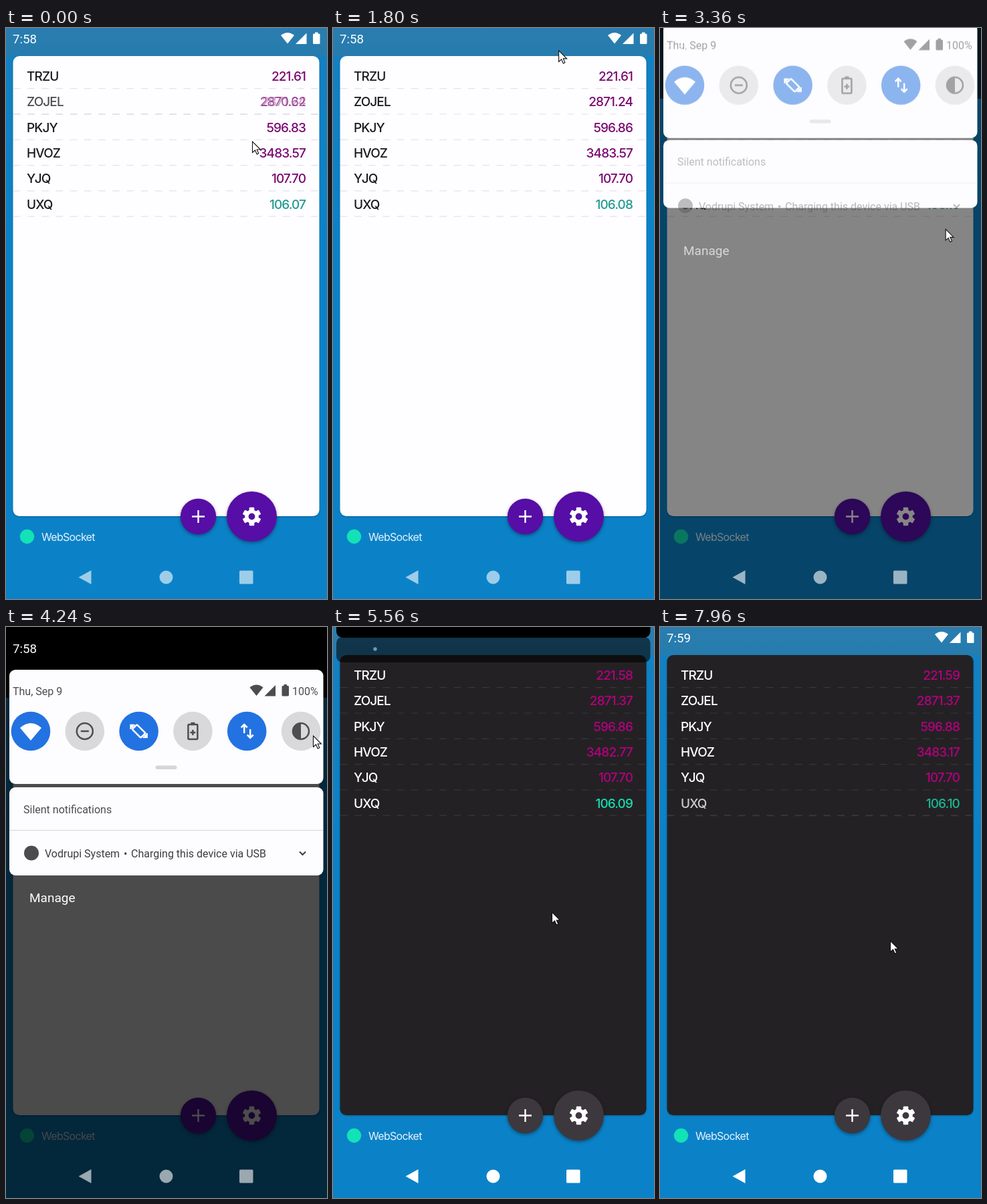
An HTML page for the animation above (8000 ms loop, 480 px wide and 855 px high).

```html
<!DOCTYPE html>
<html lang="en">
<head>
<meta charset="utf-8">
<title>Ticker list</title>
<style>
  html, body { margin: 0; width: 100%; height: 100%; overflow: hidden; background: #0b82c8; }
  svg { display: block; width: 100vw; height: 100vh; }
  text { font-family: Roboto, sans-serif; font-size: 16px; white-space: pre; }
  .row text { font: 500 19px Inter, sans-serif; letter-spacing: -.9px; }
  .row .label { fill: var(--ink); }
  .row .price { fill: var(--down); text-anchor: end; }
  .row .price.up { fill: var(--up); }
  .row path { stroke: var(--line); stroke-dasharray: 10.6 10.6; }
  .fab { fill: var(--fab); filter: drop-shadow(0 2px 2.5px #0006); }
  .clock { font-size: 18.7px; fill: #fff; }
  .socket { font: 16px Inter, sans-serif; letter-spacing: -.7px; fill: #e8f3fb; }
  .panel { fill: var(--panel); }
  .head { fill: var(--head); }
  .note { fill: var(--note); }
  .icon { fill: none; stroke: currentColor; stroke-width: 2.5; }
  .solid { fill: currentColor; stroke: none; }
</style>
</head>
<body>
<svg viewBox="0 0 480 855" preserveAspectRatio="none">
  <defs>
    <g id="signal">
      <path d="M10 17.5 0 5Q10-3 20 5Z"/>
      <path d="M38.500 1.500V18H22Z"/>
      <path d="M51 .5h4.500v2H57q1.500 0 1.500 1.500v12.500q0 1.500-1.500 1.500h-7.500q-1.500 0-1.500-1.500V4q0-1.500 1.500-1.500H51Z"/>
    </g>
    <linearGradient id="bar" x2="0" y2="1">
      <stop stop-color="#2a7dae"/><stop offset="1" stop-color="#267caf"/>
    </linearGradient>
    <linearGradient id="sky" x2="0" y2="1">
      <stop stop-color="#1480c0"/><stop offset=".35" stop-color="#0b82c8"/>
    </linearGradient>
  </defs>

  <rect width="480" height="855" fill="url(#sky)"/>
  <rect width="480" height="42" fill="url(#bar)"/>
  <g id="status">
    <text id="clock" class="clock" x="10" y="22.500"></text>
    <use href="#signal" x="411" y="6" fill="#fff"/>
  </g>
  <rect x="10.500" y="42" width="458" height="689" rx="9.500" fill="var(--card)" style="filter:drop-shadow(0 1px 1px #0004)"/>
  <g id="rows"></g>

  <circle class="fab" cx="287.500" cy="731.500" r="26.700"/>
  <path d="M278 731.500h19M287.500 722v19" stroke="#fff" stroke-width="2.400"/>
  <circle class="fab" cx="367.500" cy="731.500" r="37.500"/>
  <g id="gear" transform="translate(367.500 731.500)" fill="#fff"></g>

  <circle id="online" cx="31.500" cy="761.500" r="10.700" fill="#12e2b5"/>
  <circle id="offline" cx="31.500" cy="761.500" r="9.300" fill="none" stroke="#ffd0d0" stroke-width="2.800"/>
  <text class="socket" x="53" y="768">WebSocket</text>

  <g id="shade">
    <rect id="scrim" width="480" height="855"/>
    <rect id="top" width="480" height="106"/>
    <text id="manage" x="35" fill="#fff" style="font-size:19px">Manage</text>
    <g id="lower">
      <rect id="lowerBox" class="panel" x="5" width="469.500" rx="9"/>
      <circle id="bullet" cx="63" cy="33" r="2.700" fill="#a3b5c0"/>
      <g id="notes">
        <path d="M5 304.500h469" stroke="var(--rule)"/>
        <text class="head" x="26" y="278.500">Silent notifications</text>
        <circle cx="38" cy="338.500" r="11" class="head"/>
        <text class="note" x="58" y="345">Vodrupi System</text>
        <text class="note" x="176" y="345">•</text>
        <text class="note" x="187" y="345">Charging this device via USB</text>
        <path d="m439 336.500 4.500 4.500 4.500-4.500" fill="none" stroke="var(--note)" stroke-width="2"/>
      </g>
    </g>
    <g id="upper">
      <rect class="panel" x="5" y="64" width="469.500" height="171" rx="9"/>
      <g id="quick">
        <text class="head" x="10" y="101.500">Thu, Sep 9</text>
        <use href="#signal" class="head" x="364.500" y="85.500"/>
        <text class="head" x="428" y="101.500">100%</text>
        <g id="tiles"></g>
        <rect x="223.500" y="207.500" width="32" height="5.500" rx="2.700" fill="var(--grip)"/>
      </g>
    </g>
    <text id="shadeClock" class="clock" x="10" y="39">7:58</text>
  </g>

  <g id="nav" fill="#fff">
    <path d="M108.500 822.500 127.500 812v21Z"/>
    <circle cx="239.500" cy="822.500" r="10"/>
    <rect x="349" y="812.500" width="20.500" height="20" rx="1.500"/>
  </g>
  <path id="cursor" d="M-.5-1V15.500L3.500 12l2.700 6 2.600-1.200L6.200 11H11.500Z" fill="#fff" stroke="#111" stroke-width="1.100"/>
</svg>
<script>
const LOOP = 8000, FADE = 250;
const $ = id => document.getElementById(id);
const set = (el, attrs) => { for (const k in attrs) el.setAttribute(k, attrs[k]); };
const clamp = v => Math.min(1, Math.max(0, v));
const ramp = (t, from, to) => clamp((t - from) / (to - from));
const smooth = p => p * p * (3 - 2 * p);

function track(keys, t) {
  const i = keys.findIndex(k => k[0] > t);
  if (i === 0) return keys[0].slice(1);
  if (i < 0) return keys.at(-1).slice(1);
  const a = keys[i - 1], b = keys[i], p = smooth(ramp(t, a[0], b[0]));
  return a.slice(1).map((v, n) => v + (b[n + 1] - v) * p);
}

function mix(a, b, p) {
  const part = (hex, i) => parseInt(hex.slice(i, i + 2), 16);
  return `rgb(${[1, 3, 5].map(i => Math.round(part(a, i) + (part(b, i) - part(a, i)) * p))})`;
}

// Light and dark values
const appColors = {
  card: ['#fefdff', '#242124'], ink: ['#1b191d', '#ffffff'],
  down: ['#7a0870', '#b4007e'], up: ['#219b91', '#16dfb2'],
  line: ['#e4e2e8', '#39363a'], fab: ['#560ea6', '#3c383e']
};
const shadeColors = {
  panel: ['#fdfcfe', '#000000'], head: ['#4c4b4d', '#f4f4f4'], note: ['#3d3c3e', '#b8b8b8'],
  rule: ['#d6d5d8', '#242326'], grip: ['#d5d4d7', '#f4f4f4'],
  on: ['#2372e1', '#7193cf'], off: ['#d9d8da', '#2b282d'],
  onIcon: ['#ffffff', '#2c2f3a'], offIcon: ['#4e4d4f', '#e8e8e8']
};
const applyColors = (colors, p) => {
  for (const name in colors)
    document.documentElement.style.setProperty('--' + name, mix(...colors[name], p));
};

// Symbol, then [time, price] changes
const stocks = [
  ['TRZU', [-999, '221.61'], [2250, '221.58'], [6250, '221.59']],
  ['ZOJEL', [-999, '2870.62'], [-90, '2871.24'], [4600, '2871.37']],
  ['PKJY', [-999, '596.83'], [1500, '596.86'], [7200, '596.88']],
  ['HVOZ', [-999, '3483.57'], [4600, '3482.77'], [6800, '3483.17']],
  ['YJQ', [-999, '107.70']],
  ['UXQ', [-999, '106.07'], [820, '106.08'], [1900, '106.10'], [4600, '106.09'], [6900, '106.10'], [7800, '106.10']]
];
$('rows').innerHTML = stocks.map(([symbol], i) => {
  const y = 79 + i * 38.3, price = `<text class="price${i === 5 ? ' up' : ''}" x="448" y="${y}"></text>`;
  return `<g class="row"><text class="label" x="31" y="${y}">${symbol}</text>${price}${price}
    <path d="M11 ${y + 11.7}H468.500"/></g>`;
}).join('');
const rows = [...$('rows').children];

$('gear').innerHTML = '<circle r="10.300"/>' +
  [0, 60, 120].map(a => `<rect x="-3.800" y="-13.800" width="7.600" height="27.600" rx="1.200" transform="rotate(${a})"/>`).join('') +
  '<circle r="4.900" fill="var(--fab)"/>';

const tiles = [
  [1, '<path class="solid" d="M0 14-16-5Q0-19 16-5Z"/>'],
  [0, '<circle r="12"/><path d="M-6 0H6"/>'],
  [1, '<rect x="-5" y="-9" width="10" height="18" rx="1" transform="rotate(-45)"/><path d="M-12-3v-6h6M12 3v6H6M-12-9l4 4M12 9 8 5"/>'],
  [0, '<rect x="-7" y="-10" width="14" height="22" rx="1"/><path d="M-3-12H3M-4 2H4M0-2V6"/>'],
  [1, '<path d="M-4 3V-10M-8.500-5.500-4-10 .5-5.500M5-3V10M.5 5.500 5 10l4.500-4.500"/>'],
  [0, '<circle r="12"/><path class="solid" d="M0-12a12 12 0 0 0 0 24Z"/>']
];
$('tiles').innerHTML = tiles.map(([on, icon], i) => {
  const kind = on ? 'on' : 'off';
  return `<g transform="translate(${37 + i * 80.8} 156)" style="color:var(--${kind}Icon)">
    <circle r="29.300" fill="var(--${kind})"/><g class="icon">${icon}</g></g>`;
}).join('');
const darkTile = $('tiles').lastElementChild;

const pointer = [
  [0, 369, 171], [750, 303, 20], [1300, 303, 20], [2700, 423, 71], [2780, 423, 71],
  [2960, 424, 12], [3450, 428, 330], [4100, 460, 164], [4420, 460, 164],
  [4860, 462, 406], [4940, 462, 406], [5220, 328, 428], [5800, 328, 428], [6500, 345, 471]
];
const opening = [[2960, -.25], [3560, 1], [5230, 1], [5560, 0], [5640, -.25]];

function drawRows(t) {
  stocks.forEach(([, ...changes], i) => {
    const n = changes.findLastIndex(c => c[0] <= t);
    const p = n ? clamp((t - changes[n][0]) / FADE) : 1;
    const [label, before, after, line] = rows[i].children;
    before.textContent = n ? changes[n - 1][1] : '';
    after.textContent = changes[n][1];
    set(label, { opacity: 1 - p * (1 - p) });
    set(before, { opacity: 1 - p });
    set(after, { opacity: p });
    set(line, { 'stroke-width': p < 1 ? 2 : 1.2 });
  });
}

function drawShade(t) {
  const [k] = track(opening, t), open = clamp(k);
  const dark = ramp(t, 4440, 4640), top = 15 + 225 * k;
  applyColors(shadeColors, dark);
  set($('shade'), { visibility: k > -.24 ? 'visible' : 'hidden' });
  set($('status'), { opacity: k > -.1 ? 0 : 1 });
  set($('scrim'), { opacity: .7 * open });
  set($('top'), { opacity: open });
  set($('shadeClock'), { opacity: open });
  set($('manage'), { opacity: open, y: top + 172 });
  set($('lowerBox'), { y: top, height: 38 + 94 * k });
  set($('lower'), { opacity: .57 + .43 * clamp(3 * k) });
  set($('bullet'), { opacity: clamp(1 - 4 * Math.abs(k)) });
  set($('notes'), { opacity: clamp(2 * k - 1), transform: `translate(0 ${top - 240})` });
  set($('upper'), { transform: `translate(0 ${-219 * (1 - k)})` });
  set($('quick'), { opacity: clamp(1.5 * k - .5) });

  const pressed = ramp(t, 4320, 4440);
  const [disc] = darkTile.children;
  disc.style.fill = pressed < 1 ? mix(shadeColors.off[0], shadeColors.on[0], pressed) : 'var(--on)';
  darkTile.style.color = pressed < 1 ? mix(shadeColors.offIcon[0], shadeColors.onIcon[0], pressed) : 'var(--onIcon)';
}

function draw(now) {
  const t = now % LOOP, offline = t >= 4600 && t < 5300;
  applyColors(appColors, ramp(t, 4520, 4960));
  drawRows(t);
  drawShade(t);
  $('clock').textContent = t < 6400 ? '7:58' : '7:59';
  set($('online'), { opacity: offline ? 0 : 1 });
  set($('offline'), { opacity: offline ? 1 : 0 });
  set($('nav'), { opacity: .6 + .4 * ramp(t, 4520, 4800) });
  set($('cursor'), { transform: `translate(${track(pointer, t)})` });
}

const start = performance.now();
function frame() {
  draw(performance.now() - start);
  requestAnimationFrame(frame);
}
frame();
</script>
</body>
</html>
```
